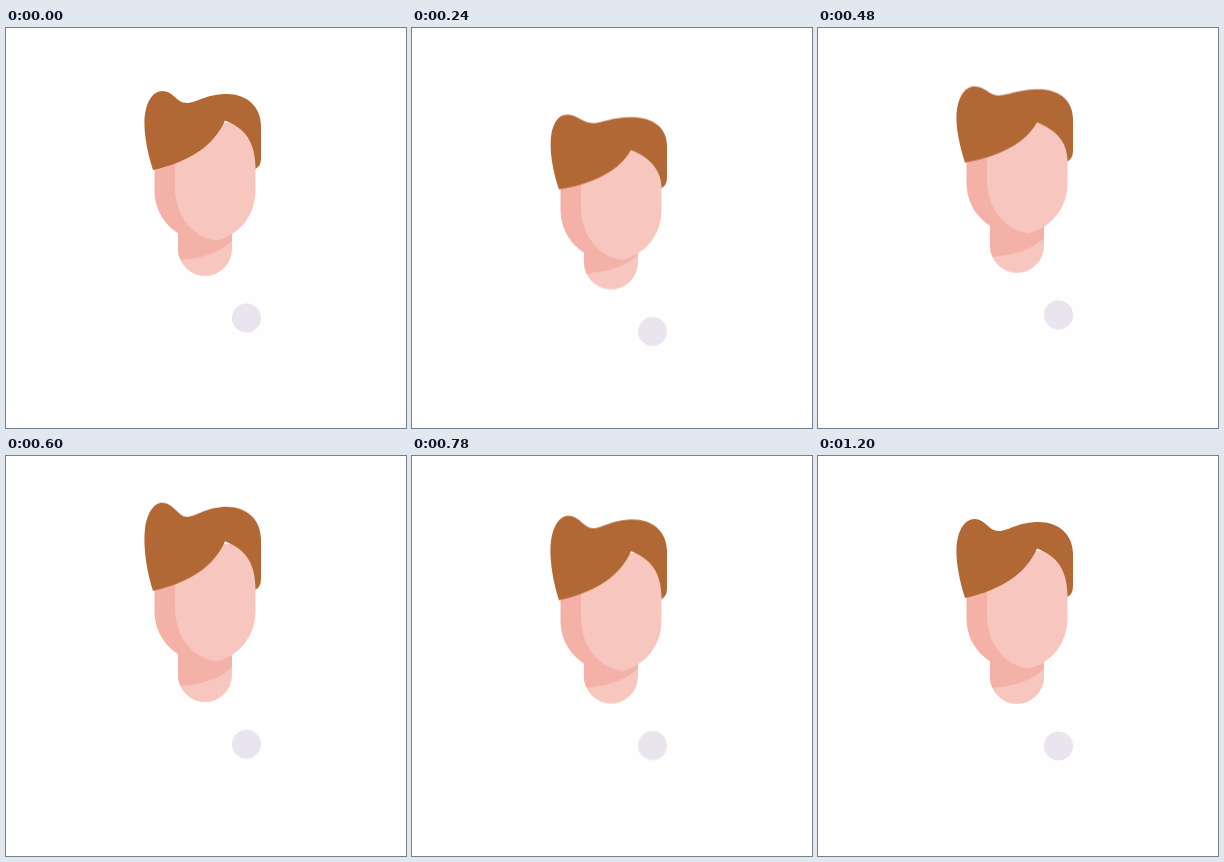
These frames come from a looping animation (400x400 px, 3800 ms). An HTML page without scripts:

```html
<!DOCTYPE html>
<html lang="en">
<head>
<meta charset="utf-8">
<title>Bobbing avatar</title>
<style>
  html, body { margin: 0; width: 100%; height: 100%; overflow: hidden; background: #fff; }
  svg { display: block; width: 100%; height: 100%; }

  .body, .head, .hair { animation: 3.8s infinite ease-in-out; }
  .body { animation-name: bob; }
  .head { animation-name: nod; }
  .hair { animation-name: flop; fill: #b16835; }
  .skin { fill: #f7c7bf; }
  .shade { fill: #f3b1a8; }

  :root {
    --rest: path("M147 142C140 121 137 98 139 86C141 72 148 63 156 63C168 63 170 75 181 75C190 75 200 66 221 66C240 66 255 78 255 98V130Q255 138 249.5 141C249.5 112 238 100 219 92.5C208 118 183 134 147 142Z");
  }

  @keyframes bob {
    0% { transform: translateY(0); }
    4.74% { transform: translateY(15px); }
    12.63% { transform: translateY(-3.2px); animation-timing-function: ease-out; }
    24.47%, 100% { transform: translateY(0); }
  }

  /* relative to the body */
  @keyframes nod {
    0%, 3.2% { transform: translateY(0); }
    8.68% { transform: translateY(9.5px); }
    14.21% { transform: translateY(-7px); animation-timing-function: ease-in; }
    18.16% { transform: translateY(.5px); animation-timing-function: ease-out; }
    22.1% { transform: translateY(3.3px); }
    24.47% { transform: translateY(3px); }
    31.58%, 100% { transform: translateY(0); }
  }

  /* relative to the head: stretch, squash, recover, stretch, settle */
  @keyframes flop {
    0%, 31.58%, 100% { d: var(--rest); }
    3.95%, 15.3%, 18.16% {
      d: path("M147 142C140 121 137 95 139 80C141 64 148 54 156 54C168 54 172 68 181 68C190 68 200 58 221 58C240 58 255 70 255 91V130Q255 138 249.5 141C249.5 112 238 100 219 92.5C208 118 183 134 147 142Z");
    }
    8.68% {
      d: path("M147 142C141 125 138 112 139 99C139.5 88 145 80 153 80C165 80 168 83 181 83C190 83 200 81 217 81C240 81 255 88 255 106V130Q255 138 249.5 140.5C249.5 131 236 119 219 112C208 127 183 138 147 142Z");
      animation-timing-function: ease-in;
    }
    12.63% {
      d: path("M147 142C140 121 137 100 139 89C141 75 148 66 156 66C168 66 170 75 181 75C190 75 200 69 221 69C240 69 255 79 255 99V130Q255 138 249.5 141C249.5 121 238 110 219 102C208 122 183 136 147 142Z");
      animation-timing-function: ease-out;
    }
    24.47% {
      d: path("M147 142C140 121 137 100 139 89C141 75 148 66 156 66C168 66 170 75 181 75C190 75 200 69 221 69C240 69 255 79 255 99V130Q255 138 249.5 141C249.5 113 238 102 219 94C208 119 183 134 147 142Z");
    }
  }
  .hair { d: var(--rest); }
</style>
</head>
<body>
<svg viewBox="0 0 400 400">
  <g class="body">
    <path fill="#fefefe" d="M106 321V268Q106 237 145 229L172 223H226L253 229Q294 237 294 268V321Q200 345 106 321Z"/>
    <path class="skin" d="M172 190V221A27 27 0 0 0 226 221V190Z"/>
    <path class="shade" d="M172 190V221Q172 227 174.5 232Q210 229 226 213V190Z"/>
    <circle cx="240.5" cy="290" r="14.5" fill="#e9e4ed"/>
    <g class="head">
      <path class="shade" d="M148.5 110V162.5A50.5 50.5 0 0 0 210 212V110Z"/>
      <path class="skin" d="M169 95V160C169 187 186 209 210 212.8A50.5 50.5 0 0 0 249.5 162.5V95Z"/>
      <path class="hair" d="M147 142C140 121 137 98 139 86C141 72 148 63 156 63C168 63 170 75 181 75C190 75 200 66 221 66C240 66 255 78 255 98V130Q255 138 249.5 141C249.5 112 238 100 219 92.5C208 118 183 134 147 142Z"/>
    </g>
  </g>
</svg>
</body>
</html>
```
